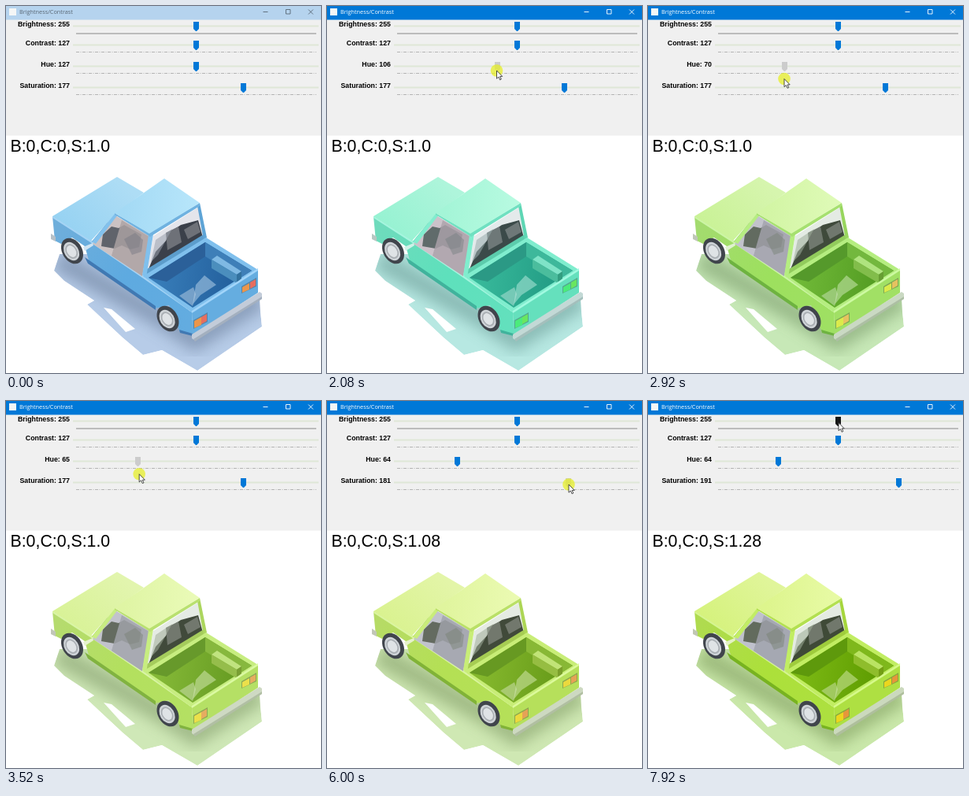
An HTML page for the animation above (8 s loop, 400 by 466 pixels).

```html
<!DOCTYPE html>
<html lang="en">
<head>
<meta charset="utf-8">
<title>Brightness/Contrast</title>
<style>
  html, body { margin: 0; width: 100%; height: 100%; overflow: hidden; background: #fff; }
  svg { display: block; width: 400px; height: 466px; }
  .label { font: bold 8.8px "Liberation Sans", Arial, sans-serif; text-anchor: end; }
  .title { font: 7.3px "Open Sans", "Noto Sans", sans-serif; }
  .info { font: 21.3px "Liberation Sans", Arial, sans-serif; }
  #car { fill: currentColor; }
  #car stop { stop-color: currentColor; }
</style>
</head>
<body>
<svg viewBox="0 0 400 466">
  <rect width="400" height="164.5" fill="#f0f0f0"/>
  <g id="bar">
    <rect id="barFill" width="400" height="17.5"/>
    <rect x="4" y="3" width="9" height="9" fill="#f4f6f6"/>
    <text class="title" x="17" y="10" id="barText">Brightness/Contrast</text>
    <path id="barIcons" d="M326.5 7.5h6M355.5 4.5h5.5v5.5h-5.5zM384 4.5l6 6M390 4.5l-6 6" fill="none" stroke-width=".9"/>
  </g>
  <g id="sliders"></g>
  <text class="info" id="info" x="5.5" y="185"></text>

  <!-- data-c: saturation, value, base hue (blue when left out) -->
  <g id="car">
    <defs>
      <linearGradient id="gHood" gradientUnits="userSpaceOnUse" x1="80" y1="290" x2="150" y2="225">
        <stop data-c=".38 .95 201"/><stop offset="1" data-c=".29 .96 200"/>
      </linearGradient>
      <linearGradient id="gRoof" gradientUnits="userSpaceOnUse" x1="150" y1="255" x2="235" y2="260">
        <stop data-c=".33 .96 200"/><stop offset="1" data-c=".27 .98 199"/>
      </linearGradient>
      <linearGradient id="gSide" gradientUnits="userSpaceOnUse" x1="70" y1="280" x2="235" y2="405">
        <stop data-c=".5 .86"/><stop offset=".5" data-c=".58 .88"/><stop offset="1" data-c=".56 .88"/>
      </linearGradient>
      <linearGradient id="gBed" gradientUnits="userSpaceOnUse" x1="195" y1="345" x2="285" y2="355">
        <stop data-c=".7 .72 208"/><stop offset="1" data-c=".77 .62 210"/>
      </linearGradient>
      <filter id="soft" x="-20%" y="-20%" width="140%" height="140%"><feGaussianBlur stdDeviation="9"/></filter>
      <clipPath id="shade">
        <path id="shadePath" d="M68 315L61 336 74 349 112 374 103 379 148 421 174 443 198 437 243 463 325 407 323 388 322 370 238 400 120 315z"/>
      </clipPath>
    </defs>

    <g clip-path="url(#shade)">
      <use href="#shadePath" data-c=".21 .91 215"/>
      <path data-c=".27 .7 215" d="M66 322L190 392 240 424 322 372" fill="none" stroke="currentColor"
        stroke-width="26" filter="url(#soft)" opacity=".85"/>
    </g>
    <path fill="#fff" d="M124 383L134 385 164 410 152 414z"/>

    <path fill="url(#gSide)" d="M59 267L108 298 174 343 236 389 237 418 221 414 207 380 189 384 106 326 100 305 84 294 70 302 62 298z"/>
    <path data-c=".64 .7 210" d="M100 319L190 381 190 386 104 327zM220 411L237 416 237 419 221 415z"/>
    <path data-c=".32 .96" d="M59 267L108 297 174 343 236 387 236 389 173 345 107 300 59 269z"/>
    <path fill="url(#gHood)" d="M59 267L141 217 175 237 139 264 108 298z"/>
    <path data-c=".08 .78" d="M57 289L63 293 63 299 57 296z"/>
    <path data-c=".62 .72" d="M109 299L128 276 132 273 115 301z"/>

    <path data-c=".05 .8 355" d="M139 266L182 292 173 343 110 302z"/>
    <path data-c=".1 .42 225" d="M123 290L134 280 143 282 150 278 172 290 169 306 158 309 147 304 138 308 121 305z"/>
    <path data-c=".06 .68 355" d="M147 272L182 293 173 343 134 317z" opacity=".82"/>
    <path data-c=".1 .5 225" d="M150 296L164 288 174 297 172 312 160 316z" opacity=".45"/>

    <path data-c=".03 .92 230" d="M187 292L245 255 252 294 178 341z"/>
    <path data-c=".2 .29 220" d="M181 334L190 312 203 298 207 288 222 278 244 272 250 294 236 302z"/>
    <path data-c=".08 .47 220" d="M203 288L219 280 223 300 205 310zM226 284L243 274 247 287 231 296z"/>
    <path data-c=".1 .68 225" d="M190 297L211 283 193 316 184 325z" opacity=".55"/>
    <path data-c=".55 .8" d="M179 334L251 290 254 296 177 344z"/>

    <path data-c=".45 .93" d="M138 264L142 265 114 302 109 299z"/>
    <path data-c=".46 .93" d="M181 291L187 290 178 345 173 342z"/>
    <path data-c=".56 .84" d="M243 254L246 250 255 294 251 297z"/>
    <path data-c=".5 .88" d="M138 263L182 288 246 250 246 254 183 293 138 265z"/>
    <path fill="url(#gRoof)" d="M138 263L201 219 246 250 182 289z"/>

    <path data-c=".46 .93" d="M174 343L254 294 320 335 236 389z"/>
    <path fill="url(#gBed)" d="M181 345L253 300 312 336 237 383z"/>
    <path data-c=".72 .6 211" d="M181 345L253 300 253 318 204 350z"/>
    <path data-c=".66 .72 208" d="M253 300L312 336 298 345 253 318z"/>
    <path data-c=".3 .87 208" d="M241 354L252 342 267 354 247 367 237 379z" opacity=".65"/>
    <path data-c=".18 .9 208" d="M220 368L238 357 241 366 237 381z" opacity=".5"/>
    <path data-c=".44 .89" d="M261 322L268 317 299 337 293 341z"/>
    <path data-c=".6 .74" d="M261 322L293 341 293 352 261 333z"/>
    <path data-c=".68 .62" d="M293 341L299 337 299 346 293 352z"/>

    <path data-c=".55 .88" d="M236 389L320 335 320 364 237 418z"/>
    <path data-c=".35 .98" d="M236 387L320 333 320 336 236 390z"/>
    <path data-c=".1 .85 215" d="M236 417L322 363 325 365 325 371 240 425 236 422z"/>
    <path data-c=".14 .75 215" d="M238 423L325 369 325 372 240 426z"/>
    <path data-c=".5 .66" d="M238 399L256 389 256 401 238 410zM299 356L318 345 318 356 299 365z"/>
    <path data-c=".68 .92 28" d="M239 400L248 395 248 405 239 409zM300 357L309 352 309 360 300 364z"/>
    <path data-c=".58 .9 6" d="M248 395L255 391 255 400 248 404zM310 351L317 347 317 355 310 359z"/>

    <g id="wheels"></g>
    <path data-c=".15 .95" d="M98 306L110 301 111 304 100 311z"/>
  </g>

  <rect id="focus" x="80.5" width="319" height="24" fill="none" stroke="#777" stroke-width=".8" stroke-dasharray="2.5 1.5"/>
  <circle id="click" r="7.8" fill="#e6ee20" opacity=".72"/>
  <path id="cursor" d="M0 0V10.2L2.4 8 4.1 11.8 5.8 11 4.1 7.4H7.2z" fill="#fff" stroke="#222" stroke-width=".8"/>
</svg>
<script>
const $ = id => document.getElementById(id);
const LOOP = 8000;

// Keyframes: [time, value, ...]
const hueKeys = [[1500, 127], [2100, 106], [2900, 70], [3300, 66], [4000, 64]];
const satKeys = [[5500, 177], [6000, 181], [6600, 191]];
const mouseKeys = [
  [100, 381, 456], [200, 390, 427], [300, 390, 427], [1200, 241, 76], [1500, 241, 76],
  [2100, 215.5, 82], [2900, 173, 92.5], [4000, 166, 93], [4600, 166, 93], [5000, 228, 131],
  [5300, 307, 115], [5400, 302, 105], [5500, 302, 106], [6000, 307, 106], [6600, 318, 107],
  [7100, 318, 107], [7900, 242, 27.5]
];
const eased = new Set([1200, 7900]);

function at(keys, t) {
  const i = keys.findIndex(k => k[0] > t);
  if (i === 0) return keys[0].slice(1);
  if (i < 0) return keys[keys.length - 1].slice(1);
  const a = keys[i - 1], b = keys[i];
  let p = (t - a[0]) / (b[0] - a[0]);
  if (eased.has(b[0])) p = p * p * (3 - 2 * p);
  return a.slice(1).map((v, j) => v + (b[j + 1] - v) * p);
}

const rows = [["Brightness", 20], ["Contrast", 44], ["Hue", 71], ["Saturation", 98]];
$("sliders").innerHTML = rows.map(([, y], i) => `
  <text class="label" x="81" y="${y + 6.4}"></text>
  <rect x="85" y="${y + 4.5}" width="312" height="2" fill="#dfe7d7"/>
  <path d="M89 ${y + (i ? 14.5 : 15)}H394" stroke="${i ? "#b4b4b4" : "#bcbcbc"}"
    stroke-width="${i ? 1 : 1.8}" ${i ? 'stroke-dasharray="4 1.5 1 1.5"' : ""}/>
  <path class="thumb" d="M-3.5 0h7v9l-3 3h-1l-3-3z"/>`).join("");
const labels = document.querySelectorAll(".label");
const thumbs = document.querySelectorAll(".thumb");

$("wheels").innerHTML = [[84, 311], [205.5, 397]].map(([x, y]) => {
  const ring = (rx, ry, fill) => `<ellipse rx="${rx}" ry="${ry}" fill="${fill}"/>`;
  return `<g transform="translate(${x} ${y}) rotate(-31)">` + ring(12.5, 17.5, "#40454c") +
    `<g transform="translate(-1 0)">` + ring(9, 12.5, "#cfd4d8") + ring(7, 10, "#a9aeb3") +
    ring(5.5, 8, "#dfe3e6") + `</g></g>`;
}).join("");

const tinted = [...document.querySelectorAll("[data-c]")].map(el => {
  const [s, v, h = 205] = el.dataset.c.split(" ").map(Number);
  return { el, s, v, h };
});

function hsv(h, s, v) {
  const f = n => {
    const k = (n + h / 60) % 6;
    return Math.round(255 * (v - v * s * Math.max(0, Math.min(k, 4 - k, 1))));
  };
  return `rgb(${f(5)},${f(3)},${f(1)})`;
}

// Hue is an 8-bit value in steps of two degrees, so it wraps at 256.
function tint(hue, gain) {
  for (const { el, s, v, h } of tinted) {
    const turned = (h / 2 + hue - 127 + 256) % 256 * 2 % 360;
    el.style.color = hsv(turned, Math.min(1, s * gain), v);
  }
}

const show = (el, on) => el.setAttribute("visibility", on ? "visible" : "hidden");
const move = (el, x, y) => el.setAttribute("transform", `translate(${x} ${y})`);

let last = -1;
function draw(now) {
  requestAnimationFrame(draw);
  const t = Math.floor((now % LOOP + 20) / 100) * 100; // ten pictures a second
  if (t === last) return;
  last = t;

  const hue = Math.round(at(hueKeys, t)[0]);
  const sat = Math.round(at(satKeys, t)[0]);
  const gain = 1 + (sat - 177) / 50;
  const [x, y] = at(mouseKeys, t);
  const pressed = t >= 1300 && t < 4600 ? 2 : t >= 5500 && t < 7100 ? 3 : -1;
  const hover = t === 1200 ? 2 : t === 5400 ? 3 : t >= 7900 ? 0 : -1;
  const active = t >= 1300;

  $("barFill").setAttribute("fill", active ? "#0078d7" : "#b5d3ee");
  $("barText").setAttribute("fill", active ? "#fff" : "#596774");
  $("barIcons").setAttribute("stroke", active ? "#fff" : "#596774");

  [255, 127, hue, sat].forEach((v, i) => {
    labels[i].textContent = `${rows[i][0]}: ${v}`;
    const offset = i ? Math.round((v - 127) * 1.2) : 0;
    move(thumbs[i], 241.5 + offset, rows[i][1]);
    thumbs[i].setAttribute("fill", i === pressed ? "#ccc" : i === hover ? "#171717" : "#0078d7");
  });

  const text = Number.isInteger(gain) ? gain.toFixed(1) : String(+gain.toFixed(2));
  $("info").textContent = `B:0,C:0,S:${text}`;
  tint(hue, gain);

  show($("focus"), (t >= 1300 && t < 1600) || t === 5500);
  $("focus").setAttribute("y", pressed === 3 ? 96.5 : 69.5);
  show($("click"), pressed >= 0);
  show($("cursor"), t >= 100);
  move($("click"), x, y);
  move($("cursor"), x, y);
}
requestAnimationFrame(draw);
</script>
</body>
</html>
```
